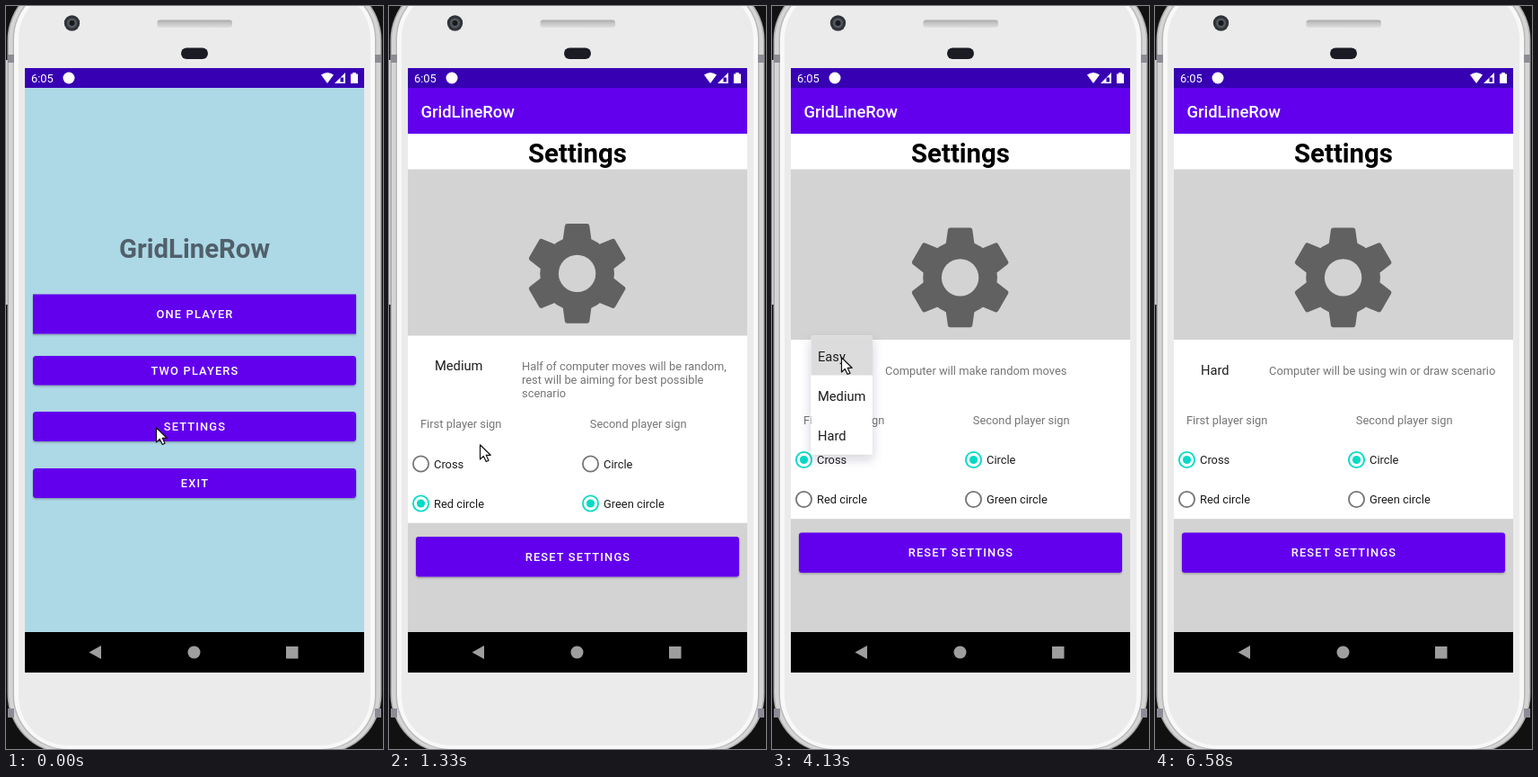
Write an HTML page that moves like this. It is 420 px wide and 826 px high and loops after 7.14 s.

```html
<!DOCTYPE html>
<html lang="en">
<head>
<meta charset="utf-8">
<title>GridLineRow</title>
<style>
  html, body { margin: 0; width: 100%; height: 100%; overflow: hidden; background: #111; }
  svg { display: block; width: 100vw; height: 100vh; }
  text { font-family: Roboto, sans-serif; font-size: 12.88px; white-space: pre; }
  .button { font-weight: 500; letter-spacing: 1.15px; fill: #fff; text-anchor: middle; }
  .heading { font-weight: 700; font-size: 29.4px; text-anchor: middle; }
  .bar { font-weight: 500; font-size: 18.4px; fill: #fff; }
  .item { font-size: 14.7px; fill: #1c1c1c; }
  .hint { fill: #757575; }
  .option { fill: #1c1c1c; }
</style>
</head>
<body>
<svg viewBox="0 0 420 826">
  <defs>
    <linearGradient id="speaker" x2="0" y2="1">
      <stop stop-color="#a9a9a9"/><stop offset=".4" stop-color="#c4c4c4"/><stop offset="1" stop-color="#dedede"/>
    </linearGradient>
    <filter id="lift" x="-10%" width="120%" y="-20%" height="160%">
      <feDropShadow dx="0" dy="1.2" stdDeviation="1" flood-opacity=".3"/>
    </filter>
    <filter id="float" x="-50%" width="200%" y="-30%" height="160%">
      <feDropShadow dx="0" dy="5" stdDeviation="6" flood-color="#202040" flood-opacity=".2"/>
    </filter>
    <clipPath id="screenClip"><rect x="21" y="69" width="378" height="672"/></clipPath>
    <clipPath id="settingsButton"><rect x="30" y="451" width="360" height="33" rx="3.5"/></clipPath>
  </defs>

  <rect width="420" height="826" fill="#111"/>
  <rect x="0" y="60" width="3" height="272" fill="#d2d2d2"/>
  <rect x="1.5" y="-28" width="417" height="859" rx="66" fill="#a8a8a8"/>
  <rect x="3" y="-27" width="414" height="857" rx="65" fill="#d5d5d5"/>
  <rect x="7.5" y="-24" width="405" height="851" rx="61" fill="#b9b9b9"/>
  <rect x="9" y="-23" width="402" height="849" rx="60" fill="#f8f8f8"/>
  <rect x="14" y="-19" width="392" height="841" rx="55" fill="#ebebeb"/>
  <path d="M2 54h7v9H2zM411 54h7v9h-7zM2 781h7v10H2zM411 781h7v10h-7z" fill="#8f8b96"/>
  <circle cx="73.500" cy="19" r="8.700" fill="#30343a"/>
  <circle cx="73.500" cy="19" r="5.500" fill="#54595f"/>
  <circle cx="73.500" cy="19" r="3" fill="#17191d"/>
  <rect x="168.500" y="15.500" width="83.500" height="8.500" rx="3" fill="url(#speaker)"/>
  <rect x="195" y="46.500" width="30" height="12.500" rx="6.200" fill="#1b1c23"/>

  <g clip-path="url(#screenClip)">
    <g id="scene"></g>
    <g fill="#fff">
      <text x="28" y="84.800">6:05</text>
      <circle cx="70" cy="80" r="6.500"/>
      <path d="M351 76.500Q358 71.500 365 76.500L358 86Z"/>
      <path d="M378 74V86H366ZM376 79.500h-3.500v5h3.500z" fill-rule="evenodd"/>
      <path d="M384 75.500h2.200v-1.500h3.600v1.500H392V86h-8z"/>
    </g>
    <g fill="#9e9e9e">
      <path d="M92.500 718.500L106 711v15z"/>
      <circle cx="209.500" cy="718.500" r="7"/>
      <rect x="312" y="712" width="13.500" height="13.500"/>
    </g>
  </g>
  <g id="popup"></g>
  <path id="cursor" d="M.5.8V17L4.300 13.400L7.200 19.500L10 18.200L7.200 12.300H12.200Z"
        fill="#fff" stroke="#111" stroke-width="1.200" stroke-linejoin="round"/>
</svg>
<script>
const LOOP = 7140, STEP = 70;
const APP = 'GridLineRow', PURPLE = '#6200ee', TEAL = '#03dac5';
const $ = id => document.getElementById(id);

const rect = (x, y, w, h, fill, extra = '') =>
  `<rect x="${x}" y="${y}" width="${w}" height="${h}" fill="${fill}" ${extra}/>`;
const circle = (x, y, r, extra) => `<circle cx="${x}" cy="${y}" r="${r}" ${extra}/>`;
const text = (x, y, label, kind, extra = '') =>
  `<text x="${x}" y="${y}" class="${kind}" ${extra}>${label}</text>`;
const button = (y, h, label, radius = 3.5) =>
  rect(30, y, 360, h, PURPLE, `rx="${radius}" filter="url(#lift)"`) +
  text(210.5, y + h / 2 + 4.6, label, 'button');
const scaled = (k, content, opacity = 1) =>
  `<g opacity="${opacity}" transform="translate(210 405) scale(${k}) translate(-210 -405)">${content}</g>`;
const systemBars = rect(21, 69, 378, 22, '#3700b3') + rect(21, 696, 378, 45, '#000');

// Cursor stops: time, x, y
const path = [
  [0, 167, 468], [1050, 167, 468], [1120, 143, 472], [1470, 73, 497], [1890, 73, 497],
  [2170, 234, 531], [2240, 230, 520], [2310, 230, 520], [2380, 227, 513], [2730, 227, 513],
  [3010, 82, 399], [3080, 85, 406], [3640, 85, 406], [3850, 77, 390], [4900, 77, 390],
  [5250, 81, 477], [5880, 81, 477], [6230, 199, 78], [6580, 225, -22], [LOOP, 225, -22]
];

function cursorAt(t) {
  const i = path.findIndex(stop => stop[0] > t);
  const [t0, x0, y0] = path[i - 1], [t1, x1, y1] = path[i];
  const k = (t - t0) / (t1 - t0);
  return [x0 + (x1 - x0) * k, y0 + (y1 - y0) * k];
}

function menu(t) {
  const press = t >= 420
    ? circle(168, 469, 30 + (t - 420) * 1.1, 'fill="#fff" opacity=".08" clip-path="url(#settingsButton)"') : '';
  return rect(21, 69, 378, 672, '#add8e6') + systemBars +
    text(210, 280, APP, 'heading', 'fill="#50606a"') +
    button(320.5, 44, 'ONE PLAYER', 0) + button(389, 32.5, 'TWO PLAYERS') +
    button(451, 33, 'SETTINGS') + press + button(514, 33, 'EXIT');
}

function gear(x, y) {
  let teeth = '';
  for (let a = 0; a < 360; a += 60)
    teeth += `<path transform="rotate(${a})" d="M-15.8-38L-13.700-53Q-13.300-55.300-11-55.300H11Q13.300-55.300 13.700-53L15.800-38Z"/>`;
  return `<g transform="translate(${x} ${y})" fill="#616161">${teeth}` +
    circle(0, 0, 41.4, '') + circle(0, 0, 20.7, 'fill="#d3d3d3"') + '</g>';
}

function radio(x, y, label, checked) {
  const color = checked ? TEAL : '#757575';
  return circle(x, y, 8.6, `fill="none" stroke="${color}" stroke-width="1.8"`) +
    (checked ? circle(x, y, 4.6, `fill="${color}"`) : '') +
    text(x + 14.5, y + 4.6, label, 'option');
}

function radioRipple(x, y, age) {
  if (age < 0 || age > 420) return '';
  return circle(x, y, Math.min(18.5, 9 + age / 14),
    `fill="${TEAL}" opacity="${0.24 * Math.min(1, (420 - age) / 210)}"`);
}

const levels = [
  { name: 'Medium', x: 148, lines: ['Half of computer moves will be random,', 'rest will be aiming for best possible', 'scenario'] },
  { name: 'Easy', x: 126, lines: ['Computer will make random moves'] },
  { name: 'Hard', x: 127, lines: ['Computer will be using win or draw scenario'] }
];

function settings(t) {
  const level = levels[t < 4130 ? 0 : t < 5670 ? 1 : 2];
  const shift = level.lines.length > 1 ? 0 : 4.5;
  const row1 = 509 - shift, row2 = 553 - shift;
  const cross = t >= 1680, ring = t >= 2660;
  return rect(21, 69, 378, 672, '#d3d3d3') + systemBars +
    rect(21, 91, 378, 51, PURPLE) + text(35.5, 123.7, APP, 'bar') +
    rect(21, 142, 378, 39.5, '#fff') + text(210, 174, 'Settings', 'heading') +
    gear(209.6, 297.4 + shift) +
    rect(21, 366.5 + shift, 378, 208.2 - 2 * shift, '#fff') +
    text(51, 405.3 + shift, level.name, 'item') +
    level.lines.map((line, i) => text(level.x, 405.2 + shift + i * 15, line, 'hint')).join('') +
    text(35, 469 - shift, 'First player sign', 'hint') +
    text(223.8, 469 - shift, 'Second player sign', 'hint') +
    radioRipple(35.5, row1, t - 1610) + radioRipple(224.5, row1, t - 2590) +
    radio(35.5, row1, 'Cross', cross) + radio(35.5, row2, 'Red circle', !cross) +
    radio(224.5, row1, 'Circle', ring) + radio(224.5, row2, 'Green circle', !ring) +
    button(590 - shift, 44.5, 'RESET SETTINGS', 3);
}

// Dropdown: fades in at open, ink spreads over a row at press, then fades out.
function dropdown(t, top, open, press, row, inkX, inkY) {
  if (t < open || t >= press + 420) return '';
  const opacity = Math.min(1, (t - open + 70) / 280, (press + 420 - t) / 280);
  const y = top + row * 44;
  const ink = t < press ? '' :
    `<clipPath id="row">${rect(43.5, y, 68.5, 44, '#000')}</clipPath>` +
    circle(inkX, inkY, 27.5 + (t - press) * 0.25, 'fill="#dcdcdc" clip-path="url(#row)"');
  return `<g opacity="${opacity}">` +
    rect(43.5, top, 68.5, 132, '#fff', 'rx="2" filter="url(#float)"') + ink +
    ['Easy', 'Medium', 'Hard'].map((name, i) => text(51, top + 28 + i * 44, name, 'item')).join('') + '</g>';
}

function render(t) {
  const age = t - 720;
  const p = age <= 0 ? 0 : age >= 400 ? 1 : 1 - 1 / (1 + (age / 70) ** 4);
  let scene = '';
  if (p < 1) scene += scaled(1 + 0.056 * p, menu(t)) + rect(21, 91, 378, 605, '#000', `opacity="${0.26 * p}"`);
  if (p > 0) scene += scaled(0.85 + 0.15 * p, settings(t), Math.min(1, Math.max(0, (age - 35) / 50)));
  $('scene').innerHTML = scene;
  $('popup').innerHTML =
    dropdown(t, 366.5, 3360, 3990, 0, 78, 390) + dropdown(t, 371, 4760, 5530, 2, 78.5, 481);
  $('cursor').setAttribute('transform', `translate(${cursorAt(t)})`);
}

let shown = -1;
function tick() {
  const t = Math.floor((performance.now() % LOOP) / STEP) * STEP;
  if (t !== shown) render(shown = t);
  requestAnimationFrame(tick);
}
tick();
</script>
</body>
</html>
```
